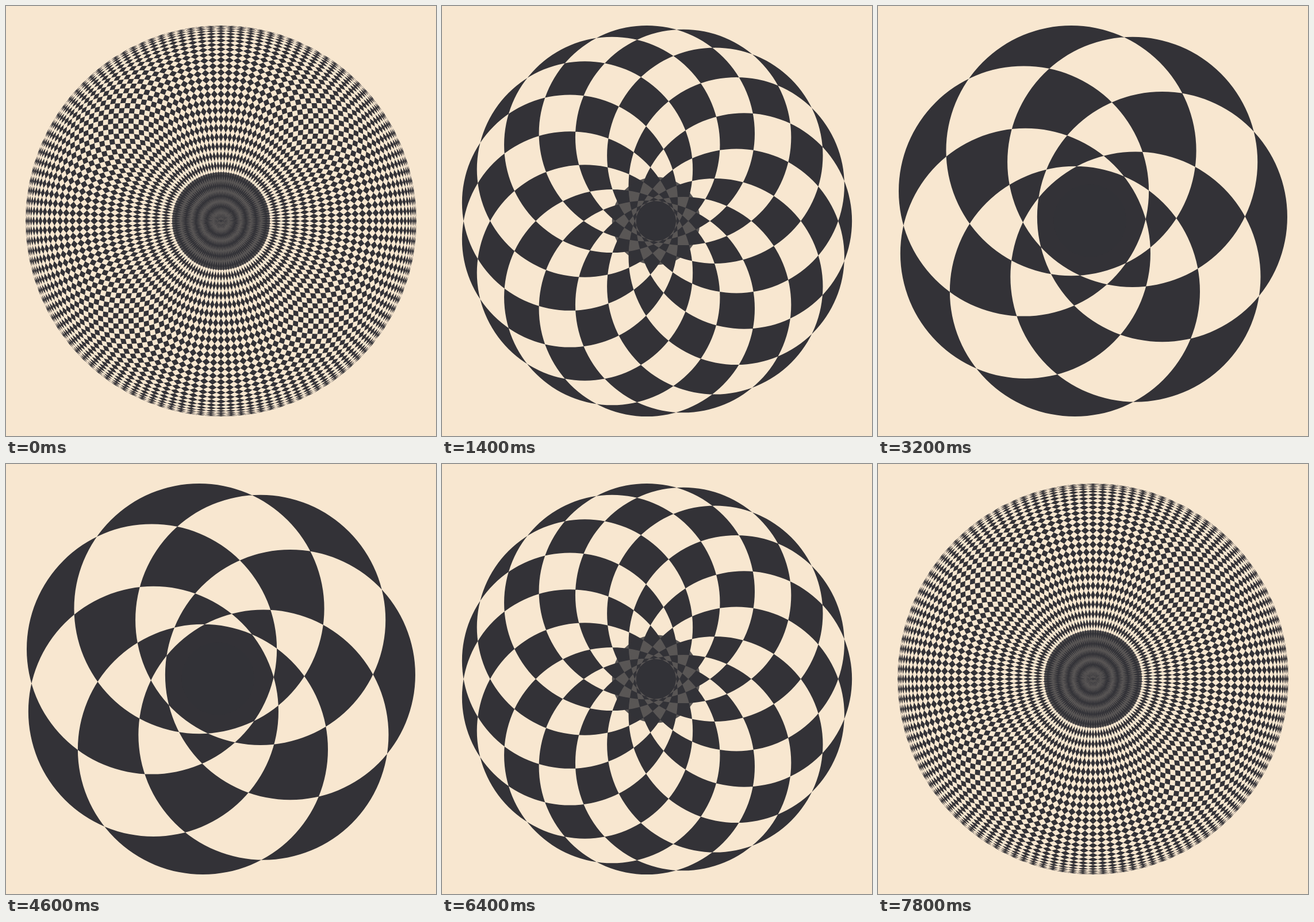
Write an HTML page with a canvas that moves like this. It is 748x748 px and loops after 8000 ms.

```html
<!DOCTYPE html>
<html lang="en">
<head>
<meta charset="utf-8">
<title>Rotated circles</title>
<style>
  html, body { margin: 0; width: 100%; height: 100%; overflow: hidden; background: #f8e7d0; }
  canvas { display: block; }
</style>
</head>
<body>
<canvas width="748" height="748"></canvas>
<script>
const ctx = document.querySelector('canvas').getContext('2d');
const SIZE = 748, FIT = 680, STEPS = 20, STEP_MS = 200;
const TAU = 2 * Math.PI;

function draw(k) {
  // Unit circles set around a ring that shrinks from 1 to 0.5.
  const ring = 1 - 0.5 * k / (STEPS - 1);
  const turn = 3 * (k + 1);
  const centers = Array.from({ length: Math.floor(360 / turn) }, (_, i) => {
    const a = (i + 1) * turn * Math.PI / 180;
    return [ring * Math.cos(a), ring * Math.sin(a)];
  });

  // Fit the bounding box of all circles to the stage.
  const [x, y] = [0, 1].map(axis => {
    const v = centers.map(c => c[axis]);
    const lo = Math.min(...v), hi = Math.max(...v);
    return { mid: (lo + hi) / 2, span: hi - lo + 2 };
  });
  const scale = FIT / Math.max(x.span, y.span);
  const cx = SIZE / 2 - x.mid * scale;
  const cy = SIZE / 2 - y.mid * scale;

  ctx.fillStyle = '#f8e7d0';
  ctx.fillRect(0, 0, SIZE, SIZE);

  ctx.fillStyle = '#333237';
  ctx.beginPath();
  for (const [px, py] of centers) {
    const ox = cx + px * scale, oy = cy + py * scale;
    ctx.moveTo(ox + scale, oy);
    ctx.arc(ox, oy, scale, 0, TAU);
    ctx.closePath();
  }
  ctx.fill('evenodd');

  // Translucent hub
  ctx.globalAlpha = 0.8;
  ctx.beginPath();
  ctx.arc(cx, cy, ring * scale / 2, 0, TAU);
  ctx.fill();
  ctx.globalAlpha = 1;
}

const start = performance.now();
let shown = -1;

function tick() {
  const s = Math.floor((performance.now() - start) / STEP_MS) % (2 * STEPS);
  const k = Math.min(s, 2 * STEPS - 1 - s);
  if (k !== shown) draw(shown = k);
  requestAnimationFrame(tick);
}
tick();
</script>
</body>
</html>
```
